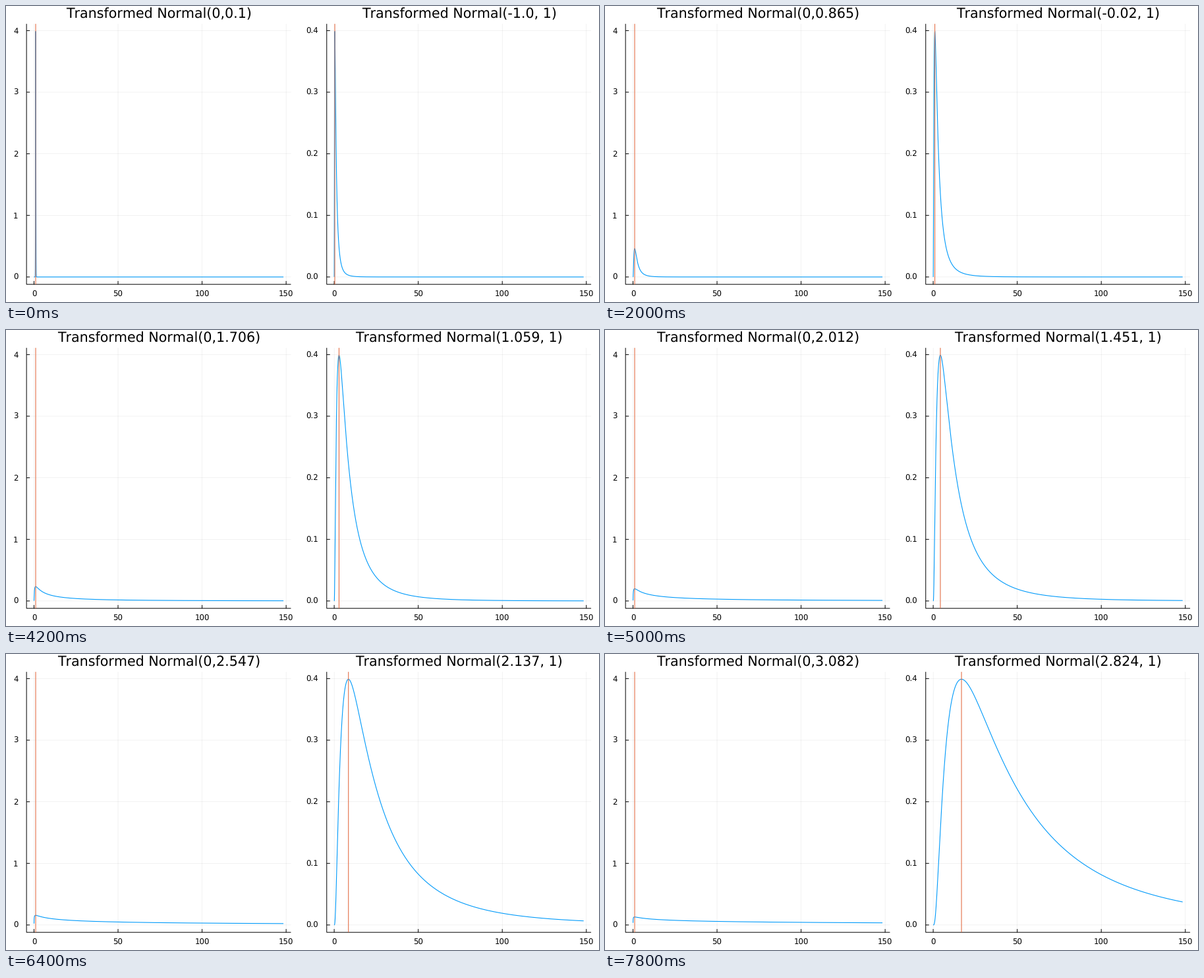
These frames come from a looping animation (900x450 px, 8 s). A matplotlib script:

```python
import numpy as np
import matplotlib.pyplot as plt
from matplotlib.animation import FuncAnimation

W, H, DPI = 900, 450, 100
FRAMES, STEP_MS = 40, 200
PX = 72 / DPI                      # points per pixel
BLUE, ORANGE = "#009AFA", "#E36F47"
PEAK = 1 / np.sqrt(2 * np.pi)      # height of a unit normal density
TOP, BOTTOM = 27.15, 423.15
PANEL_W = 401.3
TICK = 5

plt.rcParams.update({
    "font.family": "DejaVu Sans",
    "text.hinting": "none",
    "text.kerning_factor": 6,      # evenly advanced letters
})

# One stage measured in pixels from the top left corner.
fig = plt.figure(figsize=(W / DPI, H / DPI), dpi=DPI, facecolor="white")
stage = fig.add_axes([0, 0, 1, 1])
stage.set_xlim(0, W)
stage.set_ylim(H, 0)
stage.axis("off")

u = np.linspace(-5, 5, 1001)
x = np.exp(u)
SPAN = x[-1] - x[0]


def density(mu, sigma):
    return PEAK / sigma * np.exp(-0.5 * ((u - mu) / sigma) ** 2)


def line(xs, ys, color="black", width=1.0, **kw):
    return stage.plot(xs, ys, color=color, linewidth=width * PX, snap=False,
                      solid_capstyle="butt", solid_joinstyle="miter", **kw)[0]


def label(px, py, text, size, ha):
    return stage.text(px, py, text, fontsize=size * PX, ha=ha, va="baseline")


class Panel:
    def __init__(self, left, title_x, peak, yticks, fmt):
        self.left, self.peak = left, peak
        right = left + PANEL_W
        grid = dict(width=0.5, alpha=0.1, zorder=1)

        for t in (0, 50, 100, 150):
            px = self.px(t)
            line([px, px], [TOP, BOTTOM], **grid)
            line([px, px], [BOTTOM - TICK, BOTTOM])
            label(px, 441.8, str(t), 11.8, "center")
        for t in yticks:
            py = self.py(t)
            line([left, right], [py, py], **grid)
            line([left, left + TICK], [py, py])
            label(left - 12.5, py + 4.3, fmt.format(t), 11.8, "right")
        line([left, left, right], [TOP, BOTTOM, BOTTOM])

        self.curve = line([], [], BLUE, 1.1, zorder=3)
        self.center = line([], [], ORANGE, 1.1, zorder=4)
        self.title = label(title_x, 18, "", 20.6, "center")

    def px(self, v):
        return self.left + PANEL_W * ((v - x[0]) / SPAN + 0.03) / 1.06

    def py(self, v):
        return BOTTOM - (BOTTOM - TOP) * (v / self.peak + 0.03) / 1.06

    def show(self, mu, sigma, args):
        mid = self.px(np.exp(mu))
        self.curve.set_data(self.px(x), self.py(density(mu, sigma)))
        self.center.set_data([mid, mid], [TOP, BOTTOM])
        self.title.set_text(f"Transformed Normal({args})")


spread = Panel(31.15, 232.5, PEAK / 0.1, [0, 1, 2, 3, 4], "{:d}")
shift = Panel(486.75, 687.8, PEAK, [0, 0.1, 0.2, 0.3, 0.4], "{:.1f}")


def draw(i):
    sigma = 0.1 + 3.9 * i / 51
    mu = -1 + 5 * i / 51
    spread.show(0, sigma, f"0,{round(sigma, 3)}")
    shift.show(mu, 1, f"{round(mu, 3)}, 1")
    return []


anim = FuncAnimation(fig, draw, frames=FRAMES, interval=STEP_MS,
                     init_func=lambda: draw(0), repeat=True, repeat_delay=0)
plt.show()
```
